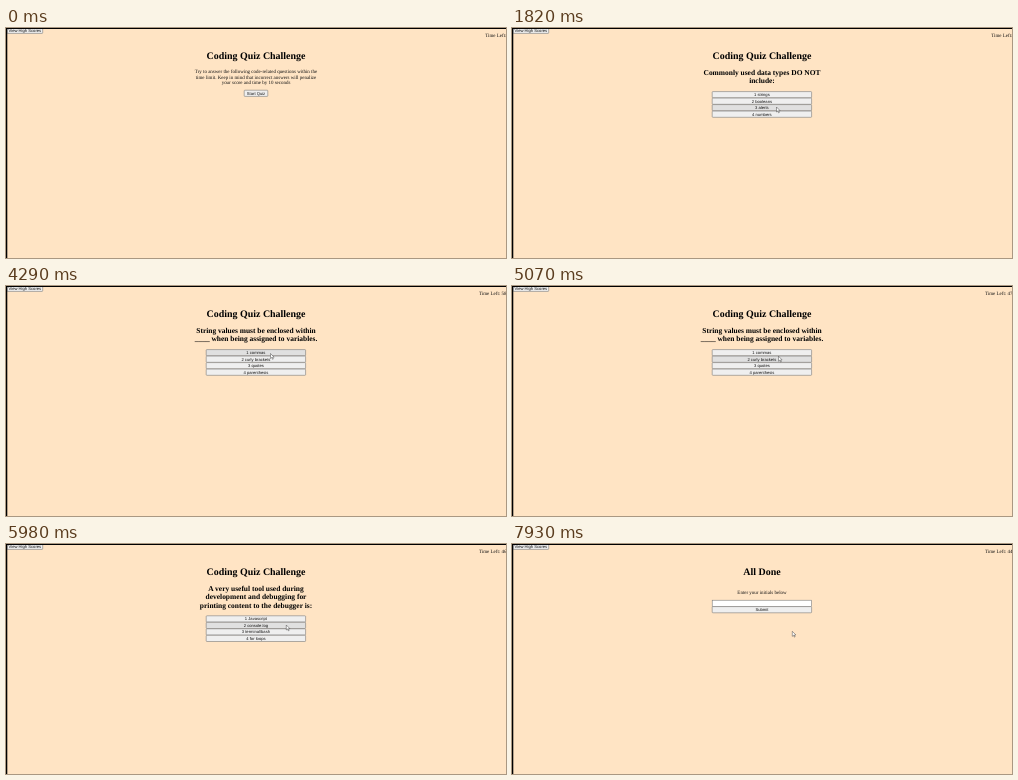
Animation of 500 by 230 pixels, one loop 8 s. Source, as an HTML page:

```html
<!DOCTYPE html>
<html lang="en">
<head>
<meta charset="utf-8">
<title>Coding Quiz Challenge</title>
<style>
  html, body { margin: 0; width: 100%; height: 100%; overflow: hidden; background: #ffe4c4; }
  svg { display: block; width: 500px; height: 230px; }
  text { font: 4.98px "Liberation Serif", serif; fill: #111; text-rendering: geometricPrecision; white-space: pre; }
  .mid { text-anchor: middle; }
  .title { font-size: 9.95px; font-weight: bold; fill: #000; }
  .question { font-size: 7.46px; font-weight: bold; fill: #000; }
  .label { font: 4.15px "Liberation Sans", sans-serif; }
  .box { fill: #efefef; stroke: #707070; stroke-width: .55; }
  .box.hover { fill: #e0e0e0; }
  .field { fill: #fff; }
</style>
</head>
<body>
<svg viewBox="0 0 500 230">
  <rect width="500" height="230" fill="#ffe4c4"/>
  <g id="page"></g>
  <text id="timer" y="8.8"></text>
  <path id="cursor" d="M0 0V5L1.2 3.9L2 5.8L2.8 5.5L2 3.7H3.6Z" fill="#fff" stroke="#222" stroke-width=".4"/>
  <path d="M0 0H500V.9H1.3V230H0Z"/>
</svg>
<script>
const LOOP = 8000, STEP = 130, ROW = 6.5;
const SVG = "http://www.w3.org/2000/svg";
const page = document.getElementById("page");
const timer = document.getElementById("timer");
const cursor = document.getElementById("cursor");

function add(parent, tag, attrs, text = "") {
  const node = document.createElementNS(SVG, tag);
  for (const key in attrs) node.setAttribute(key, attrs[key]);
  node.textContent = text;
  return parent.appendChild(node);
}

function addLines(parent, lines, y, gap, style = "") {
  lines.forEach((line, i) => add(parent, "text", { x: 250, y: y + i * gap, class: "mid " + style }, line));
}

function addButton(parent, x, y, width, label) {
  const box = add(parent, "rect", { x, y, width, height: ROW - .3, rx: .7, class: "box" });
  add(parent, "text", { x: x + width / 2, y: y + 4.65, class: "mid label" }, label);
  return box;
}

function addScene(title) {
  const group = add(page, "g", {});
  addLines(group, [title], 31.4, 0, "title");
  return group;
}

function intro() {
  const group = addScene("Coding Quiz Challenge");
  addLines(group, [
    "Try to answer the following code-related questions within the",
    "time limit. Keep in mind that incorrect answers will penalize",
    "your score and time by 10 seconds"
  ], 45, 5.6);
  return { group, buttons: [addButton(group, 238.2, 62.2, 23.6, "Start Quiz")] };
}

function quiz(lines, answers) {
  const group = addScene("Coding Quiz Challenge");
  addLines(group, lines, 46.7, 8.4, "question");
  const top = 63.6 + (lines.length - 2) * 8.2;
  const buttons = answers.map((answer, i) =>
    addButton(group, 200.2, top + i * ROW, 99.4, `${i + 1} ${answer}`));
  return { group, buttons };
}

function finish() {
  const group = addScene("All Done");
  addLines(group, ["Enter your initials below"], 49.6, 0);
  add(group, "rect", { x: 200.2, y: 56.2, width: 99.4, height: 6.2, class: "box field" });
  return { group, buttons: [addButton(group, 200.2, 62.6, 99.4, "Submit")] };
}

addButton(page, 1, -.8, 35.7, "View High Scores");

const scenes = [
  [0, intro()],
  [1430, quiz(["Commonly used data types DO NOT", "include:"],
    ["strings", "booleans", "alerts", "numbers"])],
  [2340, quiz(["The condition in an if/else statement is", "enclosed within _______."],
    ["quotes", "curly brackets", "parentheses", "square brackets"])],
  [3510, quiz(["String values must be enclosed within", "____ when being assigned to variables."],
    ["commas", "curly brackets", "quotes", "parenthesis"])],
  [5330, quiz(["A very useful tool used during", "development and debugging for", "printing content to the debugger is:"],
    ["Javascript", "console.log", "terminal/bash", "for loops"])],
  [6760, finish()]
];

// [time, value]; -1 means no button is highlighted
const hovers = [[0, -1], [1040, 0], [1430, -1], [1690, 2], [2340, -1], [3900, 0],
  [4550, 1], [5200, 2], [5330, -1], [5720, 1], [6760, -1]];
const clock = [[0, ""], [2470, 59], [3510, 58], [4420, 47], [5460, 46], [6500, 45], [7540, 44]];
// [time, x, y] of the pointer tip
const route = [[260, 330, 140], [1040, 252, 65], [1430, 252, 66], [1820, 264.5, 79],
  [3510, 264.5, 79.5], [4030, 264.5, 67.5], [4290, 264.5, 67.5], [4550, 266.5, 70.2],
  [5070, 266.5, 70.2], [5200, 266.5, 79], [5330, 266.5, 79], [5850, 280.3, 81],
  [6760, 280.3, 81], [7280, 280.3, 87.3]];

const at = (track, t) => track.filter(key => key[0] <= t).pop()[1];

function pointer(t) {
  const next = route.findIndex(key => key[0] > t);
  if (next < 0) return route[route.length - 1].slice(1);
  const [t0, x0, y0] = route[next - 1], [t1, x1, y1] = route[next];
  const u = (t - t0) / (t1 - t0), ease = u * u * (3 - 2 * u);
  return [x0 + (x1 - x0) * ease, y0 + (y1 - y0) * ease];
}

function render(now) {
  const t = Math.floor((now % LOOP) / STEP) * STEP;
  const scene = at(scenes, t), hover = at(hovers, t), left = at(clock, t);
  for (const [, { group }] of scenes) group.style.display = group === scene.group ? "" : "none";
  scene.buttons.forEach((box, i) => box.classList.toggle("hover", i === hover));
  timer.textContent = "Time Left: " + left;
  timer.setAttribute("x", left ? 473 : 479.2);
  const visible = t >= route[0][0];
  cursor.style.display = visible ? "" : "none";
  if (visible) cursor.setAttribute("transform", `translate(${pointer(t)})`);
}

const start = performance.now();
function frame() {
  render(performance.now() - start);
  requestAnimationFrame(frame);
}
frame();
</script>
</body>
</html>
```
